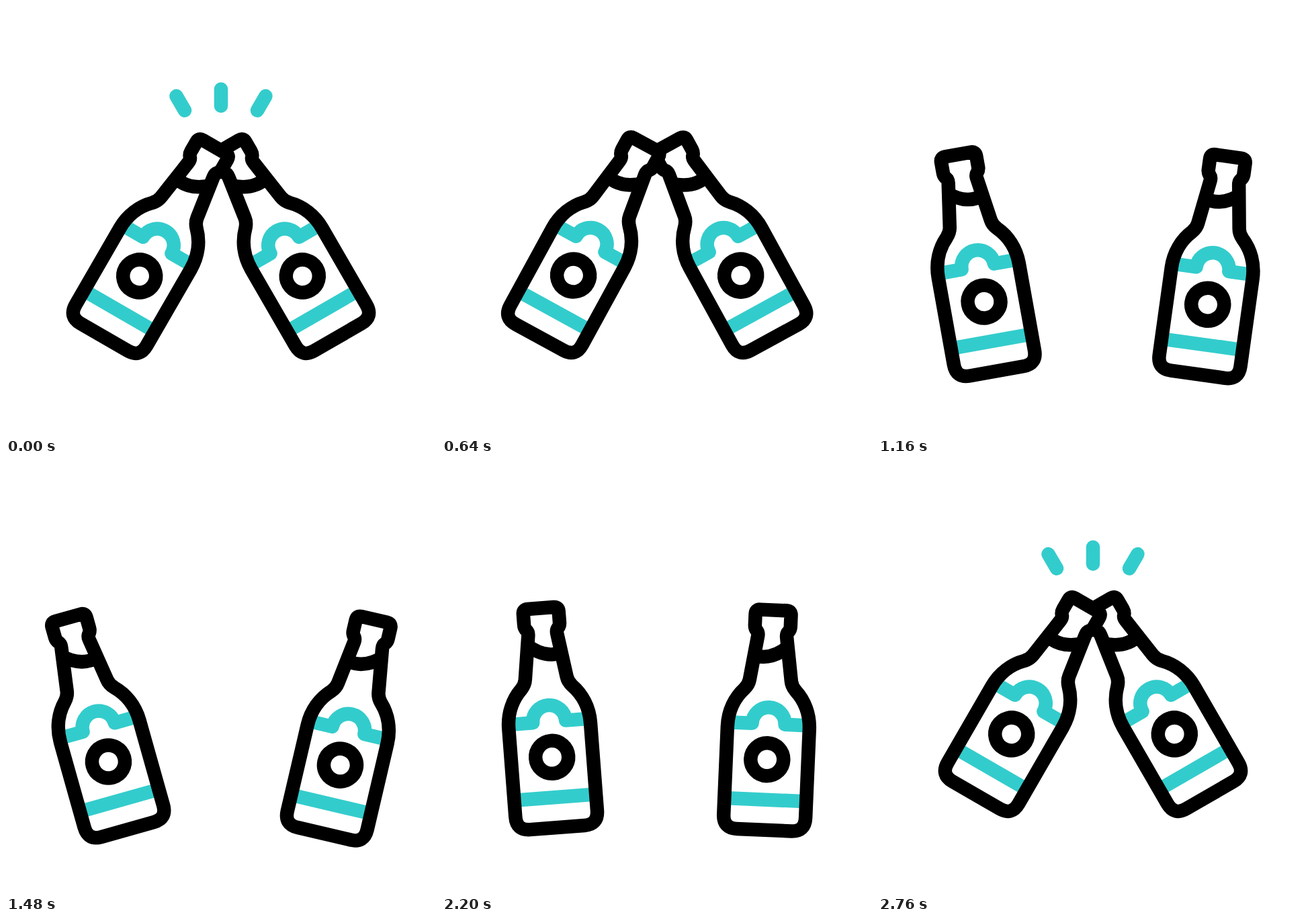
An HTML page for the animation above (2800 ms loop, 640 by 640 pixels).

```html
<!DOCTYPE html>
<html lang="en">
<head>
<meta charset="utf-8">
<title>Cheers</title>
<style>
  html, body { margin: 0; width: 100%; height: 100%; overflow: hidden; background: #fff; }
  svg { display: block; width: 100%; height: 100%; }
  .line { fill: none; stroke-width: 20.5; stroke-linejoin: round; }
  .ink { stroke: #000; }
  .teal { stroke: #3cc; }
</style>
</head>
<body>
<svg viewBox="0 0 640 640">
  <defs>
    <path id="glass" d="M-19.5-222.5 H19.5 Q26.5-222.5 26.5-215.5 V-199 Q26.5-194.5 23.5-191
      Q20.8-188 21.5-183 L31-118 Q32-110.5 38-104 C52-90 61-70 61-47 V84.5 Q61 105 40.5 105
      H-40.5 Q-61 105-61 84.5 V-47 C-61-70-52-90-38-104 Q-32-110.5-31-118 L-21.5-183
      Q-20.8-188-23.5-191 Q-26.5-194.5-26.5-199 V-215.5 Q-26.5-222.5-19.5-222.5Z"/>
    <g id="label" class="line teal">
      <path d="M-61-53 H-24.5 A24.5 24.5 0 0 1 24.5-53 H61 M-61 60 H61"/>
    </g>
  </defs>
  <g id="bottles"></g>
  <g id="sparks" class="line teal" stroke-linecap="round"></g>
</svg>
<script>
const LOOP = 2800;
const bottlesEl = document.getElementById('bottles');
const sparksEl = document.getElementById('sparks');

// Resting anchor, travel and swing; the right bottle is mirrored and lies behind.
const bottles = [
  { x: 411.3, dx: 102, dy: 40.5, swing: 44.1, side: -1 },
  { x: 228.7, dx: -94.5, dy: 36, swing: 46.7, side: 1 }
];
// Inner end, outer end
const sparks = [
  [266, 155.5, 253.5, 134],
  [320, 148.7, 320, 123.7],
  [374, 155.5, 386.5, 134]
];

for (const b of bottles) {
  bottlesEl.insertAdjacentHTML('beforeend', `<g>
    <use href="#glass" fill="#fff"/>
    <use href="#label"/>
    <path class="line ink"/>
    <circle class="line ink" r="24.5"/>
    <use href="#glass" class="line ink"/>
  </g>`);
  b.el = bottlesEl.lastElementChild;
  b.liquid = b.el.querySelector('path');
}
sparksEl.innerHTML = '<path/>'.repeat(sparks.length);

const progress = (t, from, to) => Math.min(1, Math.max(0, (t - from) / (to - from)));
const smooth = u => u * u * (3 - 2 * u);

// Cubic bezier easing with handles (a, 0) and (b, 1)
function ease(u, a, b) {
  let lo = 0, hi = 1;
  for (let i = 0; i < 24; i++) {
    const s = (lo + hi) / 2, r = 1 - s;
    if (3 * a * s * r * r + 3 * b * s * s * r + s * s * s < u) lo = s;
    else hi = s;
  }
  return smooth(hi);
}

function draw(t) {
  const out = ease(progress(t, 550, 1740), 0.3, 0.07);
  const apart = out - ease(progress(t, 1740, 2672), 0.9, 0.25);
  const recoil = smooth(progress(t, 80, 560)) - smooth(progress(t, 640, 1000));
  const slosh = 2 * (out - smooth(progress(t, 2130, 2700))) - 1;

  for (const b of bottles) {
    const x = b.x + b.dx * apart - b.side * 1.6 * recoil;
    const y = 350 + b.dy * apart - 2.7 * recoil;
    b.el.setAttribute('transform',
      `translate(${x} ${y}) scale(${b.side} 1) rotate(${30 - b.swing * apart}) translate(0 60)`);
    const tilt = 9.3 * slosh;
    b.liquid.setAttribute('d', `M-27 ${-163 - tilt} Q0-146 27 ${-163 + tilt}`);
  }

  // Sparks shoot outward, then vanish toward their outer ends.
  const shown = t > LOOP / 2;
  const head = shown ? smooth(progress(t, 2440, 2770)) : 1;
  const tail = shown ? 0 : smooth(progress(t, 80, 500));
  sparks.forEach(([x1, y1, x2, y2], i) => {
    const at = u => `${x1 + (x2 - x1) * u} ${y1 + (y2 - y1) * u}`;
    sparksEl.children[i].setAttribute('d', head > tail ? `M${at(tail)}L${at(head)}` : '');
  });
}

const start = performance.now();
function tick() {
  draw((performance.now() - start) % LOOP);
  requestAnimationFrame(tick);
}
tick();
</script>
</body>
</html>
```
